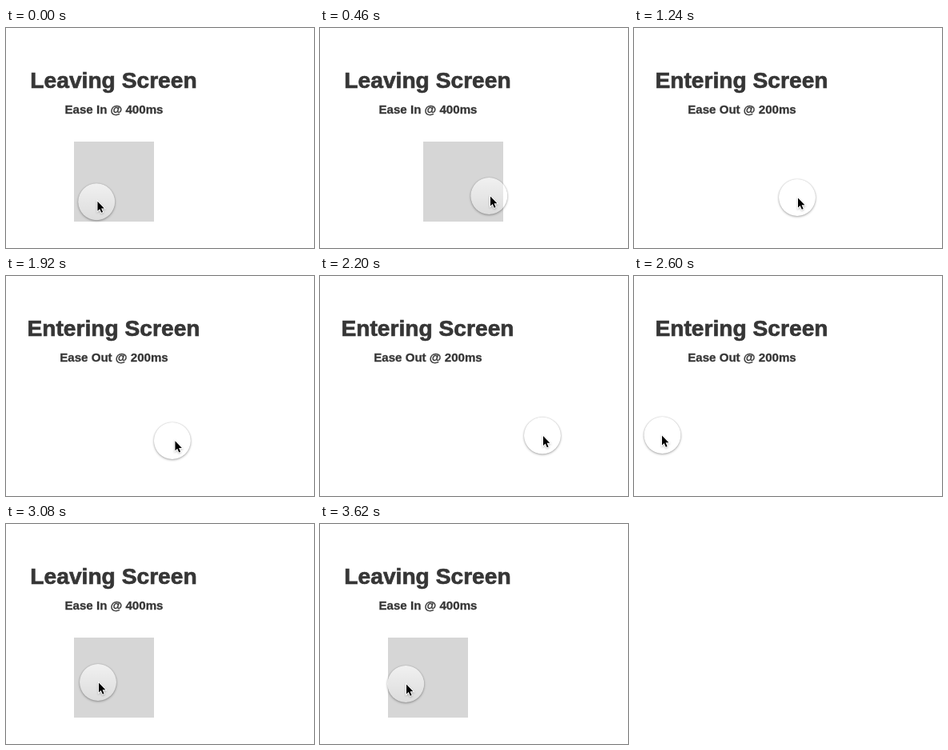
Write an HTML page that moves like this. It is 385 px wide and 275 px high and loops after 3.64 s.

```html
<!DOCTYPE html>
<html lang="en">
<head>
<meta charset="utf-8">
<title>Leaving and entering</title>
<style>
  html, body { margin: 0; width: 100%; height: 100%; overflow: hidden; background: #fff; }
  #stage { position: relative; width: 385px; height: 275px; overflow: hidden; }
  #stage > * { position: absolute; left: 0; top: 0; }
  #stage > #box { top: 142px; width: 100px; height: 100px; background: #d6d6d6; }
  #stage > #puck {
    left: -23px; top: -23px; width: 46px; height: 46px; border-radius: 50%;
    background: linear-gradient(rgba(255, 255, 255, .65), rgba(255, 255, 255, .15));
    box-shadow: 0 0 1px rgba(0, 0, 0, .3), 0 1px 3px rgba(0, 0, 0, .33);
  }
  #arrow { overflow: visible; filter: drop-shadow(0 1px 1px rgba(0, 0, 0, .25)); }
  text {
    font-family: "Liberation Sans", Arial, sans-serif; font-weight: 700;
    text-anchor: middle; fill: #363636; stroke: #363636;
  }
  #title { font-size: 28.2px; stroke-width: .7px; }
  #note { font-size: 15.1px; stroke-width: .3px; }
</style>
</head>
<body>
<div id="stage">
  <svg width="385" height="275">
    <text id="title" x="134.5" y="75"></text>
    <text id="note" x="135" y="107"></text>
  </svg>
  <div id="box"></div>
  <div id="puck"></div>
  <svg id="arrow" width="12" height="18">
    <path d="M1 1.5V13.6L3.7 11.1L5.8 15.7L7.6 14.9L5.6 10.3H9.4Z"
      fill="#000" stroke="#fff" stroke-width="1.8" paint-order="stroke"/>
  </svg>
</div>
<script>
const LOOP = 3640, STEP = 20, LAG = 20;

const home = { x: 113, y: 217 };
const moves = [
  { from: -50, to: 110, x: 115, y: 209 },
  { from: 250, to: 450, x: 212, y: 209 },    // swipe the box out
  { from: 580, to: 690, x: 204, y: 211 },
  { from: 1690, to: 1890, x: 207, y: 205 },
  { from: 1880, to: 2180, x: 278, y: 198.5 },
  { from: 2370, to: 2590, x: 34, y: 198 },
  { from: 2630, to: 2830, x: 115, y: 197 },  // swipe the box in
  { from: 3330, to: 3630, x: 107, y: 199 }
];

const $ = id => document.getElementById(id);
const place = (el, x, y) => el.style.transform = `translate(${x}px, ${y}px)`;
const progress = (t, from, to) => Math.min(1, Math.max(0, (t - from) / (to - from)));
const smooth = p => p * p * (3 - 2 * p);
const easeIn = p => p ** 3;
const easeOut = p => 1 - (1 - p) ** 3;

function pointer(t) {
  let { x, y } = home;
  for (const m of moves) {
    const p = smooth(progress(t, m.from, m.to));
    x += (m.x - x) * p;
    y += (m.y - y) * p;
  }
  return [x, y];
}

// Offset of the box from its resting place
const boxShift = t =>
  300 * (easeIn(progress(t, 267, 633)) - easeOut(progress(t, 2637, 2837)));

function draw(t) {
  const entering = t >= 920 && t < 3060;
  $('title').textContent = entering ? 'Entering Screen' : 'Leaving Screen';
  $('note').textContent = entering ? 'Ease Out @ 200ms' : 'Ease In @ 400ms';
  place($('box'), Math.round(85 + boxShift(t)), 0);
  const [x, y] = pointer(t - LAG);
  place($('puck'), x, y + 1);
  place($('arrow'), ...pointer(t));
}

let start;
function tick(now) {
  start ??= now;
  const t = (now - start) % LOOP;
  draw(t - t % STEP);
  requestAnimationFrame(tick);
}
draw(0);
requestAnimationFrame(tick);
</script>
</body>
</html>
```
